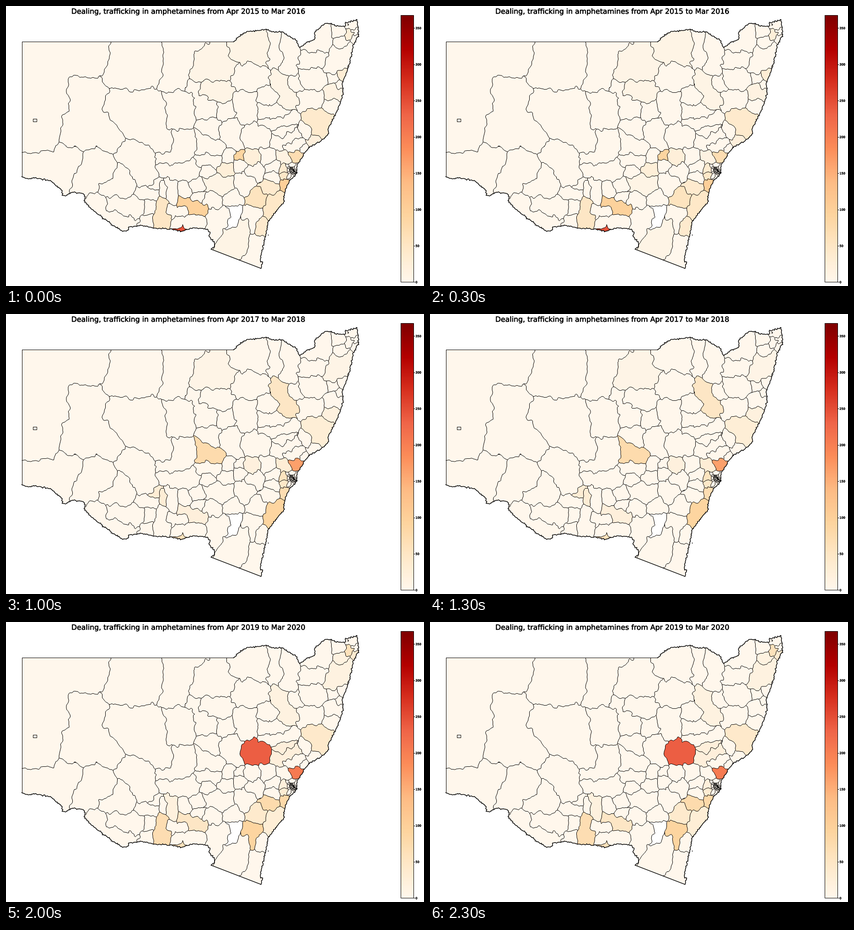
Write a matplotlib script that moves like this. It is 914 px wide and 613 px high and loops after 2500 ms.

```python
import math
import random

import matplotlib.pyplot as plt
import numpy as np
from matplotlib.animation import FuncAnimation
from matplotlib.cm import ScalarMappable
from matplotlib.colors import Normalize
from matplotlib.patches import Polygon, Rectangle
from matplotlib.patheffects import withStroke

W, H, DPI = 914, 613, 72
MAP_W = 780
VMAX = 367.5
rng = random.Random(7)

fig = plt.figure(figsize=((W + 1e-4) / DPI, (H + 1e-4) / DPI), dpi=DPI, facecolor="white")
ax = fig.add_axes([0, 0, 1, 1])
cmap = plt.get_cmap("OrRd")
norm = Normalize(0, VMAX)
heavy = [withStroke(linewidth=0.5, foreground="black")]

names, sites = [], []


def cell(*circles, name=None):
    """Add one region, given as circles (x, y, radius) that lie inside it."""
    sites.extend((*c, len(names)) for c in circles)
    names.append(name)


# Far west
cell((80, 130, 46), (180, 118, 37), (86, 200, 50), (86, 262, 36), (75, 295, 22))
cell((176, 198, 40), (150, 270, 30), (192, 262, 40), (225, 298, 15))
cell((80, 345, 26), (128, 340, 24), (120, 375, 18))
cell((285, 125, 55), (240, 145, 23))
cell((378, 120, 29), (375, 165, 16), (415, 86, 10))
cell((297, 240, 50), (245, 222, 30), (318, 280, 22), (344, 300, 17))
cell((288, 338, 34), (305, 370, 24), (262, 328, 16))
cell((255, 368, 20), (258, 398, 20), (225, 400, 14))
cell((205, 352, 32), (175, 385, 25))
cell((200, 435, 20), (238, 468, 16), (265, 475, 10), name="river")
cell((282, 439, 19), (260, 438, 18), (235, 433, 13), name="edward")
cell((295, 409, 10), (320, 411, 10))
cell((382, 215, 27), (383, 245, 20))
cell((390, 300, 26), (375, 325, 18), (345, 336, 9))

# North
cell((447, 125, 38), (480, 135, 22), (415, 148, 14), (470, 92, 14), name="walgett")
cell((450, 187, 21), (472, 190, 19), name="coonamble")
cell((515, 93, 30), (545, 88, 30), (558, 115, 14), name="moree")
cell((520, 156, 30), (552, 155, 23), name="narrabri")
cell((518, 210, 22), (525, 238, 20))
cell((435, 222, 22), (407, 178, 10))
cell((440, 268, 18), (452, 272, 14))
cell((587, 80, 13), (587, 115, 16))
cell((622, 110, 20), (617, 80, 18), (615, 135, 12))
cell((655, 118, 16), (678, 119, 17))
cell((665, 86, 12), (690, 78, 17), (693, 55, 14))
cell((660, 160, 20), (680, 160, 20), name="armidale")
cell((655, 207, 19), (675, 205, 17))
cell((597, 172, 17), (617, 205, 21), (584, 160, 8), name="tamworth")
cell((585, 232, 14), (565, 235, 12), (610, 237, 8))
cell((565, 254, 7), (592, 254, 11), (620, 248, 13))

# North coast
cell((747, 62, 7), name="lismore")
cell((764, 71, 6), name="ballina")
cell((732, 80, 11), name="richmond")
cell((728, 117, 24), (708, 132, 16), (747, 98, 10), name="clarence")
cell((736, 153, 8), (746, 141, 4), name="coffs")
cell((710, 190, 16), (727, 195, 10), name="kempsey")
cell((703, 217, 11), (718, 220, 12), name="hastings")
cell((688, 258, 27), (670, 245, 20), (692, 275, 16), name="midcoast")

# Centre
cell((436, 306, 19), (425, 287, 8), (459, 315, 10), name="parkes")
cell((490, 275, 24), (502, 298, 10), name="dubbo")
cell((537, 285, 24), (556, 286, 22), name="midwest")
cell((537, 330, 15), name="bathurst")
cell((480, 358, 12), name="cowra")
cell((507, 330, 4.5), name="orange")
cell((370, 362, 17), (400, 362, 16), (345, 358, 12))
cell((435, 338, 12), (455, 338, 10))
cell((475, 390, 19), (447, 388, 14), name="hilltops")
cell((520, 385, 14), (517, 398, 8))
cell((600, 278, 8), (620, 270, 7), name="singleton")
cell((615, 290, 10), (635, 280, 9), (593, 298, 9), name="singleton")
cell((622, 310, 8), (640, 302, 8), name="cessnock")
cell((668, 297, 6), (683, 293, 5), name="stephens")
cell((636, 330, 13), name="central")
cell((605, 332, 13), name="hawkesbury")
cell((585, 350, 12), name="bluemtns")
cell((605, 356, 6.5), name="penrith")
cell((607, 373, 6), name="liverpool")

# South
cell((580, 398, 14), name="wingecarribee")
cell((606, 395, 8), (614, 386, 8), name="wollongong")
cell((587, 428, 17), (573, 449, 11), (600, 418, 10), name="shoalhaven")
cell((548, 423, 16), name="goulburn")
cell((532, 458, 14), (551, 452, 9), (538, 478, 7), name="palerang")
cell((557, 482, 13), name="eurobodalla")
cell((500, 515, 27), (518, 480, 13), (485, 525, 22), name="snowy")
cell((455, 465, 17), (478, 460, 8), (450, 500, 10))
cell((545, 522, 15), (545, 550, 12))
cell((499, 451, 8), (499, 470, 6), name="capital")
cell((400, 433, 11), (420, 444, 13), (383, 428, 8), name="wagga")
cell((360, 447, 11), (383, 448, 9))
cell((400, 472, 12), (375, 474, 10), (420, 472, 11))
cell((341, 437, 13), (340, 467, 17), name="federation")
cell((382, 488, 5), name="albury")
cell((363, 405, 13), (357, 386, 7), (363, 422, 8), name="narrandera")
cell((325, 388, 11), name="griffith")
cell((343, 400, 9), name="leeton")

# One-circle regions that stay pale
for circle in ((480, 228, 17), (572, 196, 17), (635, 170, 13), (727, 55, 13), (757, 40, 10),
               (766, 55, 5), (713, 158, 9), (730, 173, 5), (652, 272, 11), (651, 314, 4),
               (572, 328, 14), (587, 375, 9), (388, 405, 13), (416, 392, 14), (418, 416, 10),
               (448, 425, 13), (440, 361, 12), (487, 330, 10), (509, 347, 8), (540, 358, 10),
               (495, 420, 14), (314, 440, 14), (310, 470, 9), (624, 349, 4)):
    cell(circle)

# Dense metropolitan area
for _ in range(45):
    cell((min(rng.gauss(627, 4.5), 636), rng.gauss(361, 4), 2))


def waves(x, y, n=12):
    """Smooth seeded noise as a sum of sine waves."""
    total = np.zeros_like(x)
    for _ in range(n):
        length, angle = rng.uniform(7, 30), rng.uniform(0, math.tau)
        k = math.tau / length
        phase = rng.uniform(0, math.tau)
        total += 0.04 * length * np.sin(k * math.cos(angle) * x + k * math.sin(angle) * y + phase)
    return total


def label_map():
    """Give each half pixel to the region of the nearest circle, on a warped plane."""
    axis_x = (np.arange(2 * MAP_W, dtype=np.float32) + 0.5) / 2 - 0.5
    axis_y = (np.arange(2 * H, dtype=np.float32) + 0.5) / 2 - 0.5
    x, y = np.meshgrid(axis_x, axis_y)
    x, y = x + waves(x, y), y + waves(x, y)
    best = np.full(x.shape, np.inf, dtype=np.float32)
    label = np.zeros(x.shape, dtype=np.int16)
    for cx, cy, r, owner in sites:
        power = (x - cx) ** 2 + (y - cy) ** 2 - r * r
        closer = power < best
        best[closer] = power[closer]
        label[closer] = owner
    return label


labels = label_map()
edges = np.zeros(labels.shape, dtype=bool)
for axis in (0, 1):
    edges |= np.roll(labels, 1, axis) != np.roll(labels, -1, axis)


def rough(xy, amp=0.8, step=2):
    """Join key points with a wiggly line."""
    pts = list(zip(xy[::2], xy[1::2]))
    out = [pts[0]]
    for (x0, y0), (x1, y1) in zip(pts, pts[1:]):
        dx, dy = x1 - x0, y1 - y0
        size = math.hypot(dx, dy)
        n = max(1, round(size / step))
        for k in range(1, n):
            d = rng.gauss(0, amp) / size
            out.append((x0 + dx * k / n - dy * d, y0 + dy * k / n + dx * d))
        out.append((x1, y1))
    return out


def stroke(pts, width):
    ax.plot(*zip(*pts), color="black", lw=width, zorder=5)


# Outer boundary
north = rough((497, 78, 508, 67, 527, 55, 573, 51, 580, 56, 604, 56, 634, 75, 641, 90, 655, 81,
               674, 73, 675, 56, 697, 38, 712, 39, 722, 44, 742, 43, 741, 37, 767, 29))
coast = rough((767, 29, 771, 62, 758, 88, 755, 108, 746, 141, 735, 167, 736, 190, 731, 212,
               719, 240, 704, 268, 705, 279, 687, 296, 661, 309, 636, 347, 635, 362, 632, 370,
               621, 380, 610, 401, 606, 432, 594, 444, 573, 472, 567, 505, 556, 548, 556, 560,
               561, 560, 557, 574))
river = rough((448, 532, 455, 527, 455, 518, 443, 503, 446, 496, 440, 488, 410, 485, 383, 493,
               362, 488, 326, 486, 295, 480, 268, 483, 267, 490, 255, 493, 232, 479, 185, 443,
               170, 426, 173, 417, 168, 410, 145, 407, 131, 415, 122, 414, 122, 403, 98, 383,
               60, 375, 48, 378, 34, 373))
land = Polygon(north + coast + river + [(34, 78)], fc="none", ec="none")
ax.add_patch(land)
stroke(north + coast, 1.5)
stroke(river, 1.5)
stroke([(34, 373), (34, 78), (497, 78)], 1)
stroke([(557, 574), (448, 532)], 1.4)
ax.plot(572, 501, "o", ms=2, color="black", mew=0)

picture = ax.imshow(np.ones((H, MAP_W, 3)), extent=(-0.5, MAP_W - 0.5, H - 0.5, -0.5),
                    interpolation="nearest", aspect="auto", zorder=1)
picture.set_clip_path(land)
ax.add_patch(Rectangle((58, 247), 8, 6, fc="none", ec="black", lw=1, zorder=3))
ax.set_xlim(-0.5, W - 0.5)
ax.set_ylim(H - 0.5, -0.5)
ax.axis("off")

# Colour bar
cax = fig.add_axes([862.5 / W, 1 - 604.5 / H, 28 / W, 584 / H])
bar = fig.colorbar(ScalarMappable(norm, cmap), cax=cax, ticks=range(0, 351, 50))
bar.outline.set_linewidth(1)
cax.tick_params(labelsize=6.55, length=2.6, width=1, pad=2.3)
for tick_label in cax.get_yticklabels():
    tick_label.set_path_effects(heavy)

title = ax.text(398, 16.5, "", ha="center", va="baseline", fontsize=15.73,
                family="DejaVu Sans", path_effects=heavy)

RATES = [
    dict(albury=245, wagga=95, federation=50, central=70, wollongong=100, shoalhaven=45,
         wingecarribee=38, eurobodalla=38, goulburn=55, midcoast=40, orange=90, cowra=25,
         bathurst=24, coffs=30, moree=10, tamworth=10, kempsey=14, lismore=25, hilltops=10,
         snowy=10, liverpool=45, penrith=35, hawkesbury=14, stephens=22, walgett=8, coonamble=10),
    dict(moree=28, tamworth=10, coffs=40, parkes=110, dubbo=25, griffith=55, federation=85,
         wagga=35, albury=70, wingecarribee=85, shoalhaven=38, goulburn=28, palerang=38,
         central=115, wollongong=130, cessnock=40, stephens=40, penrith=85, liverpool=115,
         armidale=12, midcoast=12),
    dict(tamworth=50, midcoast=28, parkes=75, central=165, shoalhaven=90, griffith=30, leeton=30,
         wagga=22, albury=60, wollongong=70, hawkesbury=30, penrith=55, liverpool=45, walgett=8,
         clarence=8, hastings=18, bathurst=20),
    dict(albury=215, central=150, midcoast=32, dubbo=18, hilltops=30, shoalhaven=40, goulburn=33,
         wollongong=70, edward=15, river=8, wagga=22, penrith=65, liverpool=70, stephens=22,
         armidale=12, bluemtns=16, hastings=12, wingecarribee=10),
    dict(midwest=235, central=205, federation=70, wagga=50, albury=60, palerang=90, goulburn=40,
         wingecarribee=75, wollongong=80, shoalhaven=28, lismore=60, ballina=35, richmond=15,
         clarence=15, midcoast=42, tamworth=15, singleton=22, narrandera=18, penrith=22,
         liverpool=32),
]


def update(i):
    title.set_text(f"Dealing, trafficking in amphetamines from Apr {2015 + i} to Mar {2016 + i}")
    fills = cmap(norm([RATES[i].get(name, 0) for name in names]))[:, :3].astype(np.float32)
    fills[names.index("capital")] = 1
    fine = fills[labels]
    fine[edges] = 0
    picture.set_data(fine.reshape(H, 2, MAP_W, 2, 3).mean(axis=(1, 3)))
    return picture, title


anim = FuncAnimation(fig, update, frames=len(RATES), interval=500, repeat=True, repeat_delay=0)
plt.show()
```
